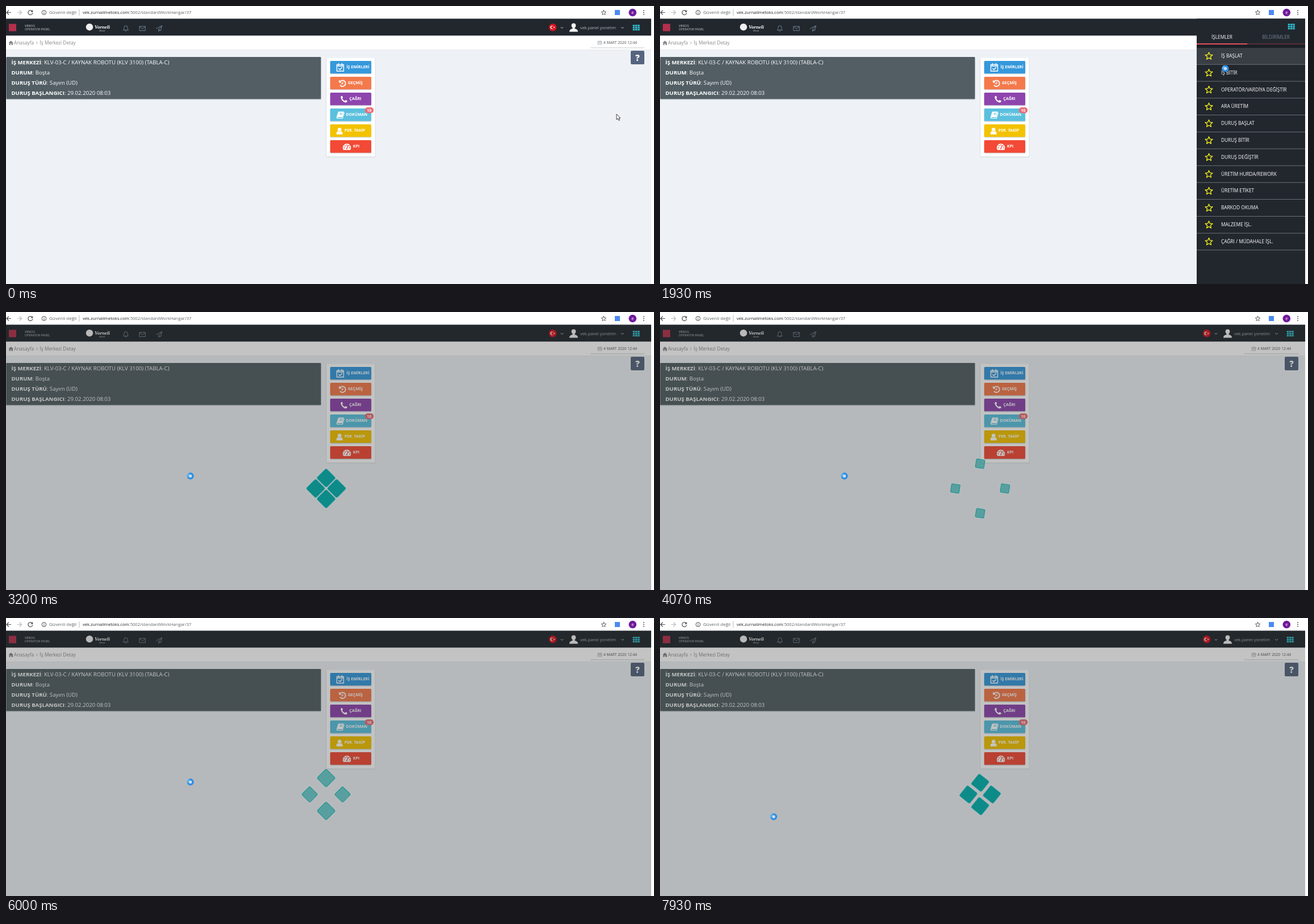
An HTML page for the animation above (8 s loop, 1141 px wide and 491 px high).

```html
<!DOCTYPE html>
<html lang="tr">
<head>
<meta charset="utf-8">
<title>Operatör paneli</title>
<style>
html, body { margin: 0; width: 100%; height: 100%; overflow: hidden; background: #fff; }
svg { display: block; width: 1141px; height: 491px; font-family: "Open Sans", "Noto Sans", sans-serif; }
.line { fill: none; stroke-linecap: round; stroke-linejoin: round; }
</style>
</head>
<body>
<svg id="stage" viewBox="0 0 1141 491" xmlns="http://www.w3.org/2000/svg"></svg>
<script>
const LOOP = 8000;

// ---- drawing helpers ----
const rect = (x, y, w, h, fill, more = '') =>
  `<rect x="${x}" y="${y}" width="${w}" height="${h}" fill="${fill}" ${more}/>`;
const circle = (x, y, r, fill, more = '') =>
  `<circle cx="${x}" cy="${y}" r="${r}" fill="${fill}" ${more}/>`;
const text = (x, y, s, size, fill, more = '') =>
  `<text x="${x}" y="${y}" font-size="${size}" fill="${fill}" ${more}>${s}</text>`;
const shape = (d, fill, more = '') => `<path d="${d}" fill="${fill}" ${more}/>`;
const line = (d, color, w = 1, more = '') =>
  `<path class="line" d="${d}" stroke="${color}" stroke-width="${w}" ${more}/>`;
const at = (x, y, s, id = '') => `<g ${id && `id="${id}"`} transform="translate(${x} ${y})">${s}</g>`;
const BOLD = 'font-weight="700"';
const MID = 'text-anchor="middle"';

function star(x, y, r, inner = 0.45) {
  const pts = Array.from({ length: 10 }, (_, i) => {
    const a = i * Math.PI / 5 - Math.PI / 2, q = i % 2 ? r * inner : r;
    return `${(x + q * Math.cos(a)).toFixed(2)} ${(y + q * Math.sin(a)).toFixed(2)}`;
  });
  return `M${pts.join('L')}Z`;
}

function grid(x, y) {
  let s = '';
  for (let i = 0; i < 9; i++) s += rect(x + (i % 3) * 4.3, y + Math.floor(i / 3) * 3.6, 3.5, 2.8, '#2fc0d0');
  return s;
}

// ---- browser bar ----
function browserBar() {
  const ink = '#4a4d51';
  return rect(0, 0, 1141, 23, '#fff') +
    line('M8.5 11.5H1M4.5 8L1 11.5L4.5 15', ink, 1.2) +
    line('M20 11.5H27.5M24 8L27.5 11.5L24 15', '#b9bbbe', 1.2) +
    line('M46.2 9.2A4 4 0 1 0 46.8 12.6', ink, 1.2) + shape('M47.3 7V10.8H43.5Z', ink) +
    circle(67, 11.5, 3.8, 'none', `stroke="${ink}"`) + line('M67 11.3V13.4M67 9.5V9.6', ink, 1) +
    text(76, 14.3, 'Güvenli değil', 8, '#5f6368') +
    rect(128.6, 6, 0.8, 11, '#a5a8ab') +
    text(135, 14.3, 'vek.zurnalimetoks.com<tspan fill="#5f6368">:5002/standardWorkHangar/37</tspan>', 7.6, '#202124') +
    line(star(1052.5, 11.8, 4.5), ink, 0.9) +
    rect(1072, 7, 9, 9, '#4a8af4') +
    circle(1103.3, 11.5, 6.8, '#6f1b9c') + text(1103.3, 13.8, 'e', 7.5, '#fff', MID) +
    [8, 11.5, 15].map(y => circle(1123, y, 0.9, ink)).join('');
}

// ---- dark header and breadcrumb ----
function header() {
  const dim = '#77869a';
  return rect(0, 22.4, 1136, 30.1, '#22272e') +
    rect(5, 31.5, 13, 13, '#b52f4c') +
    text(33, 36.8, 'VEKOS', 5.8, '#d4d7da') + text(33, 43.2, 'OPERATOR PANEL', 5.4, '#c4c8cc') +
    circle(147, 37.2, 6.2, '#f0f0f0') +
    text(156, 40.3, 'Vorneli', 9, '#fff', 'font-weight="700" font-style="italic" font-family="Liberation Serif, serif"') +
    text(164, 45, 'Metal', 4.4, '#bfc3c7', 'font-style="italic" font-family="Liberation Serif, serif"') +
    line('M206.5 42.5H215.5C214 41.2 214 39.8 214 38A3 3.3 0 0 0 208 38C208 39.8 208 41.2 206.5 42.5ZM210 44.2H212', dim, 0.9) +
    line('M235.3 36H245.3V43.5H235.3ZM235.3 36.5L240.3 40.5L245.3 36.5', dim, 0.9) +
    line('M264.5 40L274.5 34.7L272.5 43.5L268.8 41.6L274.5 34.7M268.8 41.6V45L270.5 42.6', dim, 0.9) +
    circle(962.7, 37.8, 6.8, '#d9121f') + circle(961.5, 37.8, 3, '#fff') +
    circle(962.4, 37.8, 2.4, '#d9121f') + shape(star(965.3, 37.8, 1.5), '#fff') +
    line('M977 37.5L979 39.5L981 37.5M1083.5 37.5L1085.5 39.5L1087.5 37.5', '#c3c7cb', 1) +
    circle(999.5, 34.5, 3.9, '#f4f4f4') +
    shape('M992 45.5C992 41.5 995 40.6 997.5 40V37.5H1001.5V40C1004 40.6 1007 41.5 1007 45.5Z', '#f4f4f4') +
    text(1011, 41, 'vek.panel yonetim', 7.4, '#aeb5bd') +
    grid(1103.7, 33.2);
}

function crumbs() {
  return rect(0, 52.5, 1136, 25, '#fff') + rect(0, 77.3, 1136, 0.8, '#e0e4e9') +
    shape('M4.5 65L8.7 61.2L13 65H12V69H9.7V66.4H7.8V69H5.6V65Z', '#888') +
    text(14, 68, 'Anasayfa', 8.3, '#888') +
    line('M53.5 63L55.5 65L53.5 67', '#999', 0.9) +
    text(59.5, 68, 'İş Merkezi Detay', 8.3, '#888') +
    rect(1029, 56, 95, 18.5, '#d9dde2', 'rx="1"') + rect(1029, 55, 95, 18, '#fff', 'rx="1"') +
    line('M1042.5 62.5H1049V68H1042.5ZM1042.5 64.3H1049M1044.3 61.4V63M1047.2 61.4V63M1043.5 66H1048', '#a0a4a8', 0.7) +
    text(1052, 67.4, '4 MART 2020 12:44', 6.65, '#555') +
    rect(1100, 79, 24, 24, '#56657f', 'rx="2"') +
    text(1112, 96.7, '?', 15, '#fff', MID + ' font-weight="800"');
}

// ---- information box and button card ----
function infoBox() {
  const rows = [
    ['İŞ MERKEZİ', 'KLV-03-C / KAYNAK ROBOTU (KLV 3100) (TABLA-C)'],
    ['DURUM', 'Boşta'],
    ['DURUŞ TÜRÜ', 'Sayım (UD)'],
    ['DURUŞ BAŞLANGICI', '29.02.2020 08:03']
  ];
  return rect(0, 91, 555, 74.5, '#c3cad0', 'rx="1"') + rect(0.5, 90, 554, 74.3, '#525e64', 'rx="1"') +
    rows.map(([k, v], i) =>
      text(9.5, 103 + i * 17.9, `<tspan ${BOLD}>${k}</tspan>: ${v}`, 9.65, '#fff')).join('');
}

const W = '#fff';
const buttons = [
  ['#3598dc', 'İŞ EMİRLERİ', 599.5, at(588.5, 108.5,
    line('M-6 -5H6V6.5H-6ZM-6 -2.5H6M-3 -7V-4M3 -7V-4', W, 1.4) + line('M-2.7 2L-0.5 4L3 0', W, 1.5))],
  ['#f4794b', 'GEÇMİŞ', 602, at(592.7, 136.5,
    line('M-4 -3.5A5.3 5.3 0 1 1 -4 3.8', W, 1.9) + shape('M-6.5 -6V-1H-1.5Z', W) + line('M0.3 -2.5V0.8H-2', W, 1.2))],
  ['#8e44ad', 'ÇAĞRI', 604.5, at(595, 164.5,
    shape('M-5.5 -4.5C-4 -6.5 -3 -6.5 -1.7 -3.2C-1.5 -2.5 -3 -1.8 -2.8 -1C-1.8 1 -.3 2.3 1.2 2.9C2 3 2.5 1.4 3.3 1.7C6.5 3 6.4 3.6 5 5.3C1.5 8 -6.5 1 -5.5 -4.5Z', W))],
  ['#5bc0de', 'DOKÜMAN', 598.5, at(588.5, 192.5,
    shape('M-2.5 -6H6.5L3.5 4H-5.5Z', W) + line('M-3 -5.5L-6 4C-6 6 -5 6 -4 6H3.8L7 -4', W, 1.2) +
    line('M-0.5 -3.3H3.7M-1.1 -1.2H3', '#5bc0de', 0.9))],
  ['#f3c200', 'PER. TAKİP', 596, at(587.3, 221,
    circle(0, -2.8, 3.3, W) + shape('M-5.5 5.8C-5.8 1 -3.5 0 -2.3 0.2Q0 1.6 2.3 0.2C3.5 0 5.8 1 5.5 5.8Z', W))],
  ['#f24a36', 'KPI', 611, at(600.2, 249,
    shape('M-6 5.3A7.2 7.2 0 1 1 6 5.3Z', W) + line('M0 3L1.8 -2.5', '#f24a36', 1.2) +
    [[-4.6, 1.5], [-3.2, -2], [0, -3.6], [3.6, -2], [4.7, 1.5], [0, 3]].map(p => circle(...p, 1, '#f24a36')).join(''))]
];

function card() {
  return rect(563, 91, 88, 177, '#e2e7ec', 'rx="2"') + rect(564.5, 91.5, 85, 174, '#fff') +
    buttons.map(([color, label, x, icon], i) => {
      const y = 97 + i * 28;
      return rect(570.8, y + 1, 72.4, 22.5, '#d2d6da', 'rx="1.5"') + rect(570.8, y, 72.4, 22.3, color, 'rx="1.5"') +
        icon + text(x, y + 13, label, 7, W, BOLD);
    }).join('') +
    rect(632, 179, 15.3, 10.2, '#ed6b75', 'rx="5"') + text(639.6, 186.7, '10', 7, W, `${MID} ${BOLD}`);
}

// ---- sliding side panel, drawn from its own left edge ----
const actions = ['İŞ BAŞLAT', 'İŞ BİTİR', 'OPERATÖR/VARDİYA DEĞİŞTİR', 'ARA ÜRETİM', 'DURUŞ BAŞLAT', 'DURUŞ BİTİR',
  'DURUŞ DEĞİŞTİR', 'ÜRETİM HURDA/REWORK', 'ÜRETİM ETİKET', 'BARKOD OKUMA', 'MALZEME İŞL.', 'ÇAĞRI / MÜDAHALE İŞL.'];

function panel() {
  return rect(0, 22.4, 192, 469, '#22272e') + grid(160.7, 31.3) +
    text(44.5, 58.3, 'İŞLEMLER', 8.2, '#fff', MID) + text(139.5, 58.3, 'BİLDİRİMLER', 8.2, '#75818f', MID) +
    rect(0, 68, 192, 6, '#1b2026') +
    rect(0, 66, 89, 2, '#e7505a') + rect(89, 66.3, 102, 1.4, '#6f2f39') +
    rect(0, 74, 191, 29, '#393d44', 'id="hover"') +
    actions.map((label, i) => {
      const y = 88 + i * 29.8;
      return line(star(21.5, y + 0.6, 6.8), '#f4f01c', 1.3) +
        text(43, y + 3, label, 8.3, '#fff') + rect(0, y + 14.8, 191, 0.8, '#7d8185');
    }).join('');
}

// ---- pointers ----
const arrow = shape('M0 0V9.7L2.3 7.6L4 11.2L5.6 10.5L4 7H7Z', '#fff', 'stroke="#111" stroke-width=".8"');
const hand = shape('M-1 0.8Q0 -0.6 1 0.8V4.4L4.5 5.2Q5.6 5.6 5.5 7L4.7 11H-0.8L-4 6.8Q-3.6 5.4 -1 7Z', '#fff',
  'stroke="#111" stroke-width=".8" stroke-linejoin="round"');
const busy = circle(0, 0, 4.4, '#d3dde6', 'stroke="#2c8de6" stroke-width="3.4"') +
  line('M-4.4 0.4A4.4 4.4 0 0 1 -2.4 -3.7', '#55b4f3', 2.8);

const stage = document.getElementById('stage');
stage.innerHTML =
  '<defs><clipPath id="page"><rect x="0" y="22" width="1136" height="469"/></clipPath></defs>' +
  rect(0, 0, 1141, 491, '#fff') + browserBar() +
  `<g clip-path="url(#page)">${rect(0, 52, 1136, 439, '#eef1f5')}${header()}${crumbs()}${infoBox()}${card()}` +
  rect(0, 23, 1136, 468, '#2a2b27', 'id="shade"') + at(1136, 0, panel(), 'panel') + '</g>' +
  '<g id="loader">' + rect(0, 0, 1, 1, '#0c8b89', 'stroke="#0f9496"').repeat(4) + '</g>' +
  at(0, 0, arrow, 'arrow') + at(0, 0, hand, 'hand') + at(0, 0, busy, 'busy');

const $ = id => document.getElementById(id);
const tiles = [...$('loader').children];
const clamp = v => Math.min(1, Math.max(0, v));
const span = (t, a, b) => clamp((t - a) / (b - a));
const smooth = x => (1 - Math.cos(Math.PI * x)) / 2;
const easeOut = x => 1 - (1 - x) ** 2;
const show = (el, on) => el.setAttribute('visibility', on ? 'visible' : 'hidden');

// time, x, y
const trail = [
  [0, 1075, 191], [70, 1075, 191], [670, 1109, 36], [1080, 1109, 36], [1500, 993, 100], [1900, 993, 100],
  [1901, 995.5, 110.5], [2130, 995.5, 110.5], [2700, 324.7, 289.7], [7170, 324.7, 289.7], [7560, 182, 371],
  [7720, 182, 371], [7900, 200.2, 351], [LOOP, 200.2, 351]
];

function pointerAt(t) {
  const i = Math.max(1, trail.findIndex(k => k[0] > t));
  const [a, x, y] = trail[i - 1], [b, x2, y2] = trail[i];
  const p = smooth(span(t, a, b));
  return [x + (x2 - x) * p, y + (y2 - y) * p];
}

function drawPointer(t, open) {
  const [x, y] = pointerAt(t);
  const onRow = open > 0.9 && y > 74 && y < 103;
  const kind = t >= 1901 ? 'busy' : (y < 44 || onRow) ? 'hand' : 'arrow';
  for (const id of ['arrow', 'hand', 'busy']) show($(id), id === kind);
  $(kind).setAttribute('transform', `translate(${x} ${y})`);
  show($('hover'), onRow || (t >= 1901 && t < 1965));
}

// Tiles drift out, spin half a turn and snap back together; the upper and lower ones shrink later.
const OUT = 900, BACK = 1185, CYCLE = 1200;
const spread = q => q < OUT ? smooth(span(q, 0, OUT)) : 1 - smooth(span(q, OUT, BACK));

function drawLoader(t) {
  show($('loader'), t >= 1990);
  const q = (t - 2000 + CYCLE) % CYCLE;
  const p = spread(q);
  const turn = 45 + 180 * smooth(span(q, 684, 1191));
  const reach = 18.5 + 25.3 * p;
  tiles.forEach((tile, i) => {
    const a = i * Math.PI / 2;
    const lag = i % 2 && q < OUT ? 255 * Math.sin(Math.PI * q / OUT) : 0;
    const size = 23.4 - 8.4 * spread(q - lag);
    const x = 563.7 + reach * Math.cos(a), y = 311.7 + reach * Math.sin(a);
    tile.setAttribute('transform', `translate(${x} ${y}) rotate(${turn}) translate(${-size / 2} ${-size / 2})`);
    tile.setAttribute('width', size);
    tile.setAttribute('height', size);
    tile.setAttribute('rx', size * 0.11);
    tile.setAttribute('fill-opacity', 1 - 0.45 * clamp((p - 0.08) * 4));
  });
}

function render(t) {
  const open = easeOut(span(t, 830, 1130)) - easeOut(span(t, 1967, 2267));
  $('panel').setAttribute('transform', `translate(${1136 - 191 * open} 0)`);
  $('shade').setAttribute('opacity', 0.284 * span(t, 1945, 2110));
  drawPointer(t, open);
  drawLoader(t);
}

const start = performance.now();
function tick() {
  render((performance.now() - start) % LOOP);
  requestAnimationFrame(tick);
}
tick();
</script>
</body>
</html>
```
